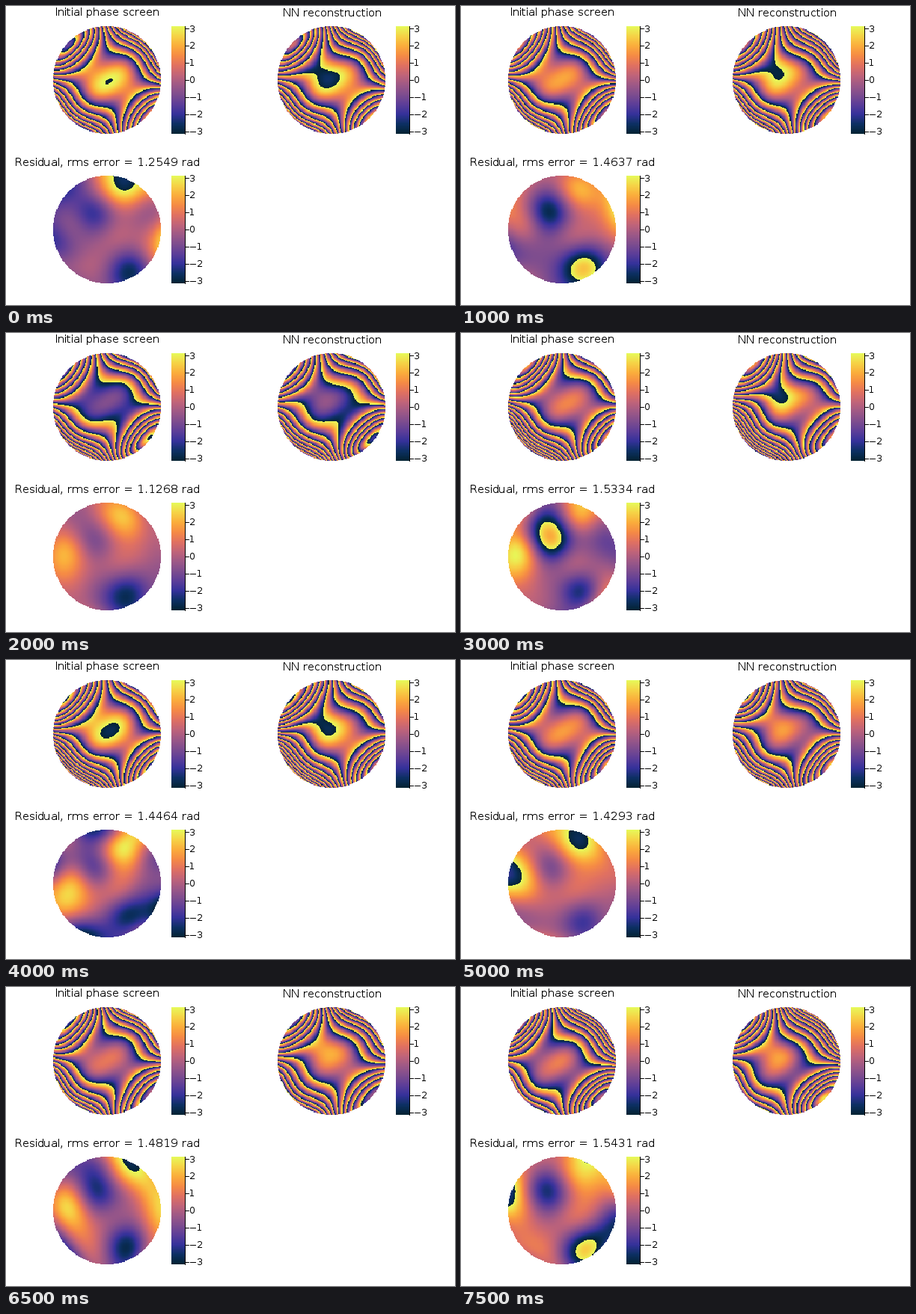
Write a matplotlib script that moves like this. It is 600 by 400 pixels and loops after 8 s.

```python
import numpy as np
import matplotlib.pyplot as plt
from matplotlib.animation import FuncAnimation
from matplotlib.colors import LinearSegmentedColormap

plt.rcParams.update({"font.family": "DejaVu Sans", "text.hinting": "native",
                     "text.hinting_factor": 1, "text.kerning_factor": 6})

W, H, DPI = 600, 400, 100
FRAMES, INTERVAL = 16, 500
SIDE, GRID = 144, 128

thermal = LinearSegmentedColormap.from_list("thermal", [
    "#032333", "#0d3064", "#35329b", "#5d3e99", "#7e4d8f", "#9e5987",
    "#c16479", "#e17161", "#f68b45", "#fbad3c", "#f6d346", "#e7fa5a"], N=256)

# Pupil coordinates; U points to the upper left, V to the upper right.
axis = (np.arange(GRID) + 0.5) / GRID * 2 - 1
X, Y = np.meshgrid(axis, -axis)
U, V = (Y - X) / np.sqrt(2), (X + Y) / np.sqrt(2)
R2 = X**2 + Y**2
OUTSIDE = R2 > 1

# Step: (phase at the centre, rms error)
KEYS = {0: (3.2, 1.2549), 2: (1.9, 1.4637), 4: (-0.8, 1.1268),
        6: (1.3, 1.5334), 8: (3.6, 1.4464), 11: (0.8, 1.4208),
        15: (1.2, 1.5431)}


def at_step(i):
    return [np.interp(i, list(KEYS), col) for col in zip(*KEYS.values())]


def ripple(rng, waves=10, freq=2.4):
    """Smooth random field of unit variance."""
    field = np.zeros_like(X)
    for _ in range(waves):
        kx, ky = rng.normal(0, freq, 2)
        field += np.cos(kx * X + ky * Y + rng.uniform(0, 2 * np.pi))
    return field * np.sqrt(2 / waves)


def bump(x, y, height, width=0.3):
    return height * np.exp(-((X - x)**2 + (Y - y)**2) / (2 * width**2))


def screen(rng, level):
    """A central ridge between two steep slopes and two rising lobes."""
    u = U - rng.normal(0, 0.04)
    v = V - rng.normal(0.06, 0.05)
    lobes = -28 * u**2 + 130 * u**4 - 75 * u**6
    slopes = -(8 + 45 * u**2) * v**2 - 25 * v**4
    return level + lobes + slopes - 12 * u * v + 2.5 * R2 * ripple(rng)


def residual(rng, rms):
    """Low spots at upper left and lower right, high ones at left and top."""
    field = (bump(-0.25, 0.3, -2.3) + bump(-0.7, 0.1, 2.0)
             + bump(0.3, 0.75, 2.4) + bump(0.4, -0.7, -2.6)
             + bump(0.2, -0.1, 0.9) + (0.3 + R2) * ripple(rng))
    return field * rms / np.sqrt(np.mean(field[~OUTSIDE]**2))


def wrap(phase):
    phase = (phase + np.pi) % (2 * np.pi) - np.pi
    return np.ma.masked_array(phase, OUTSIDE)


fig = plt.figure(figsize=(W / DPI, H / DPI), dpi=DPI, facecolor="white")
ax = fig.add_axes([0, 0, 1, 1])
ax.axis("off")


def px(size):
    return size * 72 / DPI


def picture(data, x, y, w):
    return ax.imshow(data, cmap=thermal, vmin=-np.pi, vmax=np.pi, aspect="auto",
                     interpolation="nearest", extent=(x, x + w, y + SIDE, y))


def panel(x, y, title):
    """Disc, title and colour bar; x, y is the disc's upper left corner."""
    disc = picture(wrap(np.zeros((GRID, GRID))), x, y, SIDE)
    label = ax.text(x + 72.5, y - 13.5, title, ha="center", va="baseline",
                    fontsize=px(15))
    picture(np.linspace(np.pi, -np.pi, 256)[:, None], x + 158, y, 18)
    bar = x + 175.5
    ax.plot([bar, bar], [y, y + SIDE], color="black", lw=px(1))
    for n in range(-3, 4):
        ty = y + SIDE / 2 - n * SIDE / (2 * np.pi)
        ax.plot([bar, bar + 5], [ty, ty], color="black", lw=px(1))
        ax.text(x + 182.5, ty + 4.3, str(n).replace("-", "\u2212"),
                va="baseline", fontsize=px(12))
    return disc, label


first, _ = panel(63, 27, "Initial phase screen")
second, _ = panel(363, 27, "NN reconstruction")
third, caption = panel(63, 227, "")
ax.set_xlim(0, W)
ax.set_ylim(H, 0)


def draw(i):
    rng = np.random.default_rng(40 + i)
    level, rms = at_step(i)
    phase, error = screen(rng, level), residual(rng, rms)
    first.set_data(wrap(phase))
    second.set_data(wrap(phase - error))
    third.set_data(wrap(error))
    caption.set_text(f"Residual, rms error = {rms:.4f} rad")
    return first, second, third, caption


anim = FuncAnimation(fig, draw, frames=FRAMES, interval=INTERVAL,
                     repeat=True, repeat_delay=0, blit=False)
plt.show()
```
